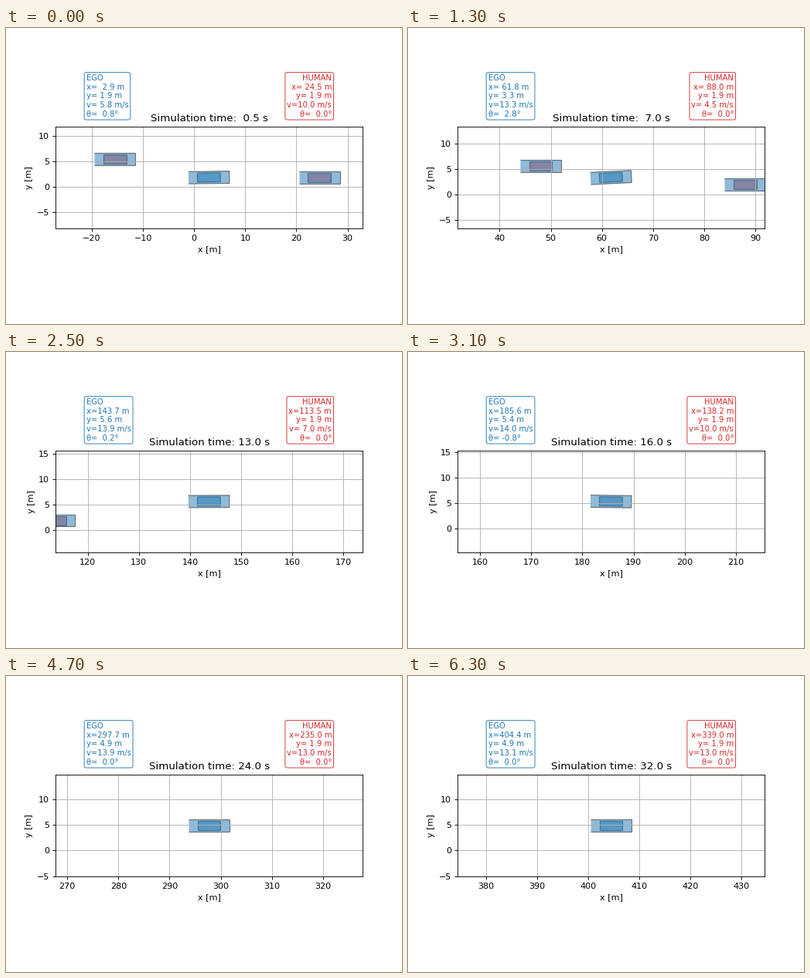
A matplotlib script for the animation above (6400 ms loop, 512 px wide and 384 px high).

```python
import numpy as np
import matplotlib.pyplot as plt
from matplotlib.animation import FuncAnimation
from matplotlib.patches import Polygon

DT = 0.5
STEPS = 64
RIGHT_LANE, LEFT_LANE = 1.875, 5.5
BLUE, RED = "tab:blue", "tab:red"

times = DT * np.arange(1, STEPS + 1)


def integrate(start, rate):
    return start + np.concatenate([[0], np.cumsum(rate[1:] + rate[:-1]) * DT / 2])


# Ego car: speeds up, then drifts into the left lane and settles
ego_v = np.interp(times, [0.5, 2.5, 4.5, 7, 9.5, 13, 23, 28.5, 32],
                  [5.8, 7.2, 9.8, 13.29, 13.64, 13.945, 14.06, 13.155, 13.055])
ego_vy = np.interp(times, [0.5, 2.5, 4.5, 7, 9.5, 11, 13, 16, 19.5, 23],
                   [0.08, 0.188, 0.068, 0.654, 0.52, 0.223, 0.05, -0.198, -0.03, 0])
ego_x = integrate(2.9, ego_v)
ego_y = integrate(RIGHT_LANE, ego_vy)
ego_angle = np.degrees(np.arctan2(ego_vy, ego_v))

# Human car: brakes hard, then returns to cruising; moves in Euler steps
human_v = np.interp(times, [0.5, 3, 8, 8.5, 18.5, 22.5, 23],
                    [10, 12.5, 2.5, 2.5, 12.5, 12.5, 13])
human_x = 24.5 + DT * (np.cumsum(human_v) - human_v)

fig, ax = plt.subplots(figsize=(6.4, 4.8), dpi=80)
ax.set_aspect("equal")
ax.set_xlabel("x [m]", x=0.5025)
ax.set_ylabel("y [m]")
ax.grid(True)
title = ax.set_title("", x=0.5025)


class Car:
    def __init__(self, color):
        self.parts = [self.box(4.5, 1.8, color), self.box(8, 2.4, BLUE, closed=False)]

    @staticmethod
    def box(w, h, color, closed=True):
        corners = np.array([(-w, -h), (w, -h), (w, h), (-w, h)]) / 2
        patch = Polygon(corners, closed=closed, fc=color, ec="black", lw=1, alpha=0.5)
        return ax.add_patch(patch), corners

    def move(self, x, y, angle=0):
        c, s = np.cos(np.radians(angle)), np.sin(np.radians(angle))
        for patch, corners in self.parts:
            patch.set_xy(corners @ np.array([(c, s), (-s, c)]) + (x, y))


def info_box(x, align, color):
    return ax.text(x, 1.085, "", transform=ax.transAxes, fontsize=9, color=color,
                   ha=align, va="bottom", multialignment=align,
                   bbox=dict(boxstyle="round,pad=0.25", fc="white", ec=color, lw=0.8))


def describe(name, x, y, v, angle):
    angle = round(float(angle), 1) + 0.0  # no negative zero
    return (f"{name}\nx={x:5.1f} m\ny={y:4.1f} m\n"
            f"v={v:4.1f} m/s\nθ={angle:5.1f}°")


ego, human, follower = Car(BLUE), Car(RED), Car(RED)
ego_info = info_box(0.1, "left", BLUE)
human_info = info_box(0.9, "right", RED)


def update(i):
    x, y = ego_x[i], ego_y[i]
    ego.move(x, y, ego_angle[i])
    human.move(human_x[i], RIGHT_LANE)
    follower.move(human_x[i] - 40, LEFT_LANE)
    ax.set_xlim(x - 30, x + 30)
    ax.set_ylim(y - 10, y + 10)
    title.set_text(f"Simulation time: {times[i]:4.1f} s")
    ego_info.set_text(describe("EGO", x, y, ego_v[i], ego_angle[i]))
    human_info.set_text(describe("HUMAN", human_x[i], RIGHT_LANE, human_v[i], 0))


anim = FuncAnimation(fig, update, frames=STEPS, interval=100, repeat=True)
plt.show()
```
